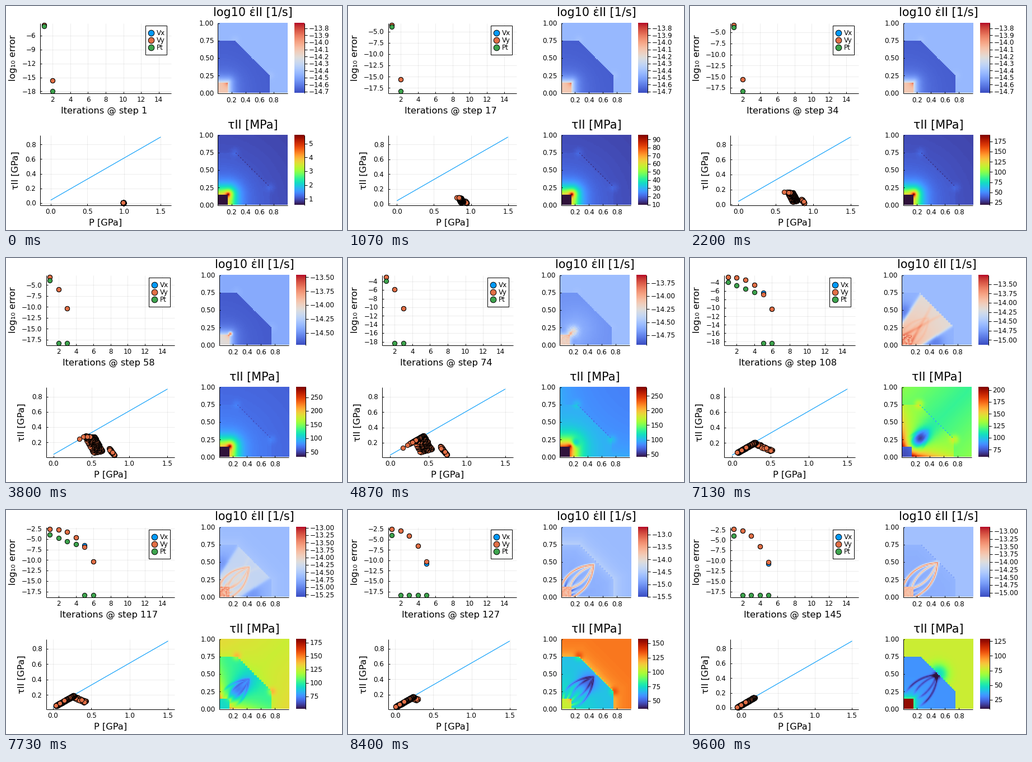
A matplotlib script for the animation above (9.67 s loop, 600 by 400 pixels).

```python
import numpy as np
import matplotlib.pyplot as plt
from matplotlib.animation import FuncAnimation
from matplotlib.collections import LineCollection
from matplotlib.patches import Rectangle

STEPS, LOOP_MS = 145, 9670
FRAMES = STEPS + 1  # the last step is held a little longer
W, H, DPI = 600, 400, 100
PX = 72 / DPI
TICK, GUIDE, TITLE = 11.9, 16.3, 20.8
BLUE, ORANGE, GREEN = "#009AFA", "#E26F46", "#3DA44D"
ROWS = ((30.5, 155.5), (230.5, 355.5))
ONSET = 46  # first step with plastic flow

plt.rcParams["font.family"] = "DejaVu Sans"
fig = plt.figure(figsize=(W / DPI, H / DPI), dpi=DPI, facecolor="white")
ax = fig.add_axes([0, 0, 1, 1])
ax.axis("off")
ax.set_autoscale_on(False)
rng = np.random.default_rng(4)
live = []


def ease(s, a, b):
    k = np.clip((s - a) / (b - a), 0, 1)
    return k * k * (3 - 2 * k)


# ---- scalar histories
def error_range(s):
    return -17.94 - .2 * np.log10(s), -3.7 + .0095 * (s - 1)


def rate_range(s):
    pulse = np.cos(2 * np.pi * (s - 90) / 36)
    lo = -14.72 - ease(s, 58, 90) * (.61 + .19 * pulse)
    hi = -13.725 + .0105 * max(s - ONSET, 0) + .18 * ease(s, ONSET, 58) * pulse
    return lo, hi


def tau_range(s):
    softening = 206 + 81 * np.cos(np.pi * max(s - 62, 0) / 92)
    return min(.55 * s, 65 - 1.52 * (s - 108)), min(5.61 * s, softening)


def residuals(s):
    lo, hi = error_range(s)
    stall = 96 <= s < 118  # pressure converges slowly here
    n = 2 + int(np.ceil(np.clip((s - ONSET) / 28, 0, 3))) + stall
    end = -15.6 if n == 2 else -10.3
    k = np.arange(n)
    vy = hi + (end - hi) * (k / (n - 1)) ** (.45 * n)
    vx = vy.copy()
    if stall:
        vx[-2] += .4
    elif s > 96:
        vx[-1] -= .5
    pt = np.where(k < (4 if stall else 1), -3.92 - .78 * k, lo)
    return vx, vy, pt


# ---- stress cloud: elastic patches that slide onto the yield line
V, U = [a.ravel() for a in np.meshgrid(np.linspace(1, 0, 9), np.linspace(1, 0, 44), indexing="ij")]
U = np.r_[U + rng.uniform(-.02, .02, U.size), -.12, -.5, rng.uniform(.1, .6, 2)]
V = np.r_[V + rng.uniform(-.05, .05, V.size), np.zeros(4)]
SU, SV = rng.random((2, 70))

# corners (P, tau) after 34 elastic steps
MAIN = np.array([(.655, .165), (.735, .155), (.72, .04), (.79, .055)])
SIDE = np.array([(.84, .08), (.885, .02), (.845, .06), (.88, .018)])


def yield_stress(p):
    return 0.041 + 0.5736 * p


def elastic(corners, u, v, s):
    u, v = u[:, None], v[:, None]
    a, b, c, d = corners
    p, t = ((1 - v) * ((1 - u) * a + u * b) + v * ((1 - u) * c + u * d)).T
    p = 1 - (1 - p) * s / 34
    return np.array([p, np.minimum(t * s / 34, yield_stress(p) + .004)])


def cloud(s):
    centre, reach = .18 - .0033 * (s - 108), .115
    p = centre + reach * (2 * np.clip(U, 0, 1) - 1) + .015 * V
    strip = np.array([p, yield_stress(p) - .015 * V])
    tip = centre + reach
    tail = .24 * (1 - ease(s, 104, 140)) * SU
    arc_p = tip + tail - .03 * SV
    bend = np.array([arc_p, yield_stress(tip) - .45 * tail - .02 * SV])

    late = ease(s, 70, 108)
    main = (1 - late) * elastic(MAIN, U, V, s) + late * strip
    side = (1 - late) * elastic(SIDE, SU, SV, s) + late * bend
    return np.hstack([side, main])


# ---- field maps, normalised to their colour range
N = 62
X, Y = np.meshgrid((np.arange(N) + .5) / N, (np.arange(N) + .5) / N)
R = np.hypot(X, Y)
OCT = (X < .75) & (Y < .75) & (X + Y < .999)
SQ = (X < .15) & (Y < .15)
D = np.hypot(np.maximum(X - .15, 0), np.maximum(Y - .15, 0))
DC = np.hypot(X - .15, Y - .15)
RIM = np.maximum(np.maximum(X, Y) - .75, (X + Y - 1) / 2 ** .5)
DASH = (np.abs(X + Y - 1) < .005) & (np.arange(N) % 2 == 0) & (X > .25) & (Y > .25)
NOISE = rng.uniform(-1, 1, (N, N))
FAN = np.cos(18 * np.arctan2(Y, X)) * np.exp(-D / .07) * ~SQ


def blob(x, y, r):
    return np.exp(-((X - x) ** 2 + (Y - y) ** 2) / r ** 2)


def zones(square, inside, outside):
    return np.where(SQ, square, np.where(OCT, inside, outside))


def both(f):
    return f + f.T


NOTCH = both(blob(.25, .75, .06))
LENS = 1 / (1 + np.exp(-np.minimum(.3 + 1.55 * X - Y, .3 + 1.55 * Y - X) / .02))


def rate_fields():
    start = zones(.6 + .35 * np.exp(-DC / .04),
                  .03 + .4 * np.exp(-D / .06) + .1 * np.exp(-R / .35),
                  .28 + .03 * NOTCH)
    early = start * .84 + .5 * blob(.16, .16, .025)
    lobe = (.42 + .15 * NOISE) * blob(.2, .2, .07)
    spread = zones(.64 + .05 * NOISE,
                   .31 + .12 * blob(.25, .25, .25) + lobe - both(.12 * blob(.05, .2, .05)),
                   .36) - .05 * DASH
    cross = both(np.exp(-((Y - .12 - .55 * X) / .025) ** 2)) * np.exp(-R / .4)
    lens = .62 - .14 * R + .14 * np.exp(-R / .2) + .25 * cross
    rest = .26 - both(.13 * blob(.03, .48, .12))
    flow = zones(.75 + .12 * NOISE, rest + (lens - rest) * LENS, .29) + .12 * DASH
    halo = np.exp(-np.abs(RIM) / .1)
    shear = zones(.68 + .06 * NOISE, .25 + .06 * halo + .22 * FAN, .29 + .08 * halo) - .1 * DASH
    late = zones(.65 + .03 * NOISE, .25 + .02 * halo + .12 * FAN, .31) - .1 * DASH
    return [start, start, early, spread, flow, shear, late]


def tau_fields():
    glow = .45 * np.exp(-(D / .12) ** 1.3) + .5 * np.exp(-DC / .03)
    far = .06 + .09 * np.exp(-R / .7)
    start = zones(0, far + .01 + glow, far) + .025 * NOTCH - .04 * DASH
    early = zones(0, start + .04, start + .04)
    spread = zones(0, .31 + .62 * np.exp(-D / .13) - .4 * blob(.22, .2, .06),
                   .2 + .12 * both(np.exp(-X / .3))) + .08 * NOTCH - .08 * DASH
    wall = both(np.exp(-X / .1 - np.maximum(Y - .15, 0) / .35))
    along, across = (X + Y) / 2, X - Y
    valley = (.36 * np.exp(-((along - .26) / .1) ** 2 - (across / .13) ** 2)
              + .1 * np.exp(-(across / .25) ** 2))
    flow = zones(.08 + 1.2 * R ** 2, .47 + .5 * wall - valley,
                 .38 + .09 * np.abs(across)) + .12 * NOTCH - .15 * DASH
    shear = zones(.55 + .4 * np.exp(-DC / .03),
                  .25 + .18 * np.exp(-R / .25) - .14 * blob(.38, .38, .13) + .1 * FAN,
                  .76 - .08 * np.exp(-RIM / .08)) + .12 * NOTCH - .2 * DASH
    late = zones(.97, .19 + .2 * np.exp(-D / .06) - .2 * blob(.48, .48, .05),
                 .56 - .25 * blob(.5, .5, .14)) - .1 * DASH
    return [start, start, early, spread, flow, shear, late]


FIELD_KEYS = [1, ONSET, 58, 90, 108, 127, 145]
RATES, TAUS = rate_fields(), tau_fields()


def blend(fields, s):
    k = np.interp(s, FIELD_KEYS, range(len(FIELD_KEYS)))
    j = min(int(k), len(fields) - 2)
    return fields[j] + (k - j) * (fields[j + 1] - fields[j])


def arc(start, ctrl, tip):
    q = np.linspace(0, 1, 50)[:, None]
    path = (1 - q) ** 2 * start + 2 * q * (1 - q) * ctrl + q ** 2 * tip
    gap = np.min((X[..., None] - path[:, 0]) ** 2 + (Y[..., None] - path[:, 1]) ** 2, axis=2)
    band = np.exp(-gap / .017 ** 2)
    return np.maximum(band, band.T)


def shear_bands(s):
    t = .33 + .16 * np.sin(np.pi / 2 * (s - 98) / (STEPS - 98))
    tip = np.array([t, t])
    outer = arc(np.array([0, .17]), np.array([.3, .95]) * t, tip)
    inner = arc(np.array([.13, .15]), np.array([.4, .75]) * t, tip)
    return np.maximum(outer, .75 * inner) * ease(s, 98, 127)


def maps(s):
    rate, tau = blend(RATES, s), blend(TAUS, s)
    if s > 98:
        band = shear_bands(s) * ~SQ
        rate = rate + band * np.maximum(.76 - rate, 0)
        tau = tau - .15 * band * np.clip((R - .2) / .15, -1, 1)
    return np.clip(rate, 0, 1), np.clip(tau, 0, 1)


# ---- drawing helpers, all in stage pixels
def image(cmap, data):
    return ax.imshow(data, cmap=cmap, vmin=0, vmax=1, origin="lower", aspect="auto",
                     interpolation="nearest", zorder=1)


RAMP = np.linspace(0, 1, 256)[:, None]
CMAPS = ("coolwarm", "turbo")
map_imgs = [image(c, np.zeros((N, N))) for c in CMAPS]
bar_imgs = [image(c, RAMP) for c in CMAPS]
ax.set_xlim(0, W)
ax.set_ylim(H, 0)


def text(x, y, label, size, ha="center", angle=0):
    live.append(ax.text(x, y, label, fontsize=size * PX, ha=ha, va="baseline",
                        rotation=angle, rotation_mode="anchor", zorder=8))


def tick_text(x, y, label, ha="center"):
    text(x, y + .365 * TICK, label, TICK, ha)


def lines(segments, color="black", width=1, alpha=1, z=3):
    live.append(ax.add_collection(LineCollection(
        segments, colors=color, linewidths=width * PX, alpha=alpha, zorder=z), autolim=False))


def dots(x, y, color, size=8.2, z=5):
    live.extend(ax.plot(x, y, "o", ms=size * PX, mfc=color, mec="black", mew=PX, zorder=z))


def number(v, digits):
    return f"{v + 0.0:.{digits}f}".replace("-", "−")


def ticks(lo, hi, step):
    return np.arange(np.ceil(lo / step - 1e-6), np.floor(hi / step + 1e-6) + 1) * step


def padded(lo, hi):
    pad = .03 * (hi - lo)
    return lo - pad, hi + pad


def axes(x0, x1, row, xlim, ylim, xticks, yticks, xdig, ydig, label_y, gap=7.5, grid=True):
    top, bot = ROWS[row]
    fx = lambda v: x0 + (v - xlim[0]) / (xlim[1] - xlim[0]) * (x1 - x0)
    fy = lambda v: bot - (v - ylim[0]) / (ylim[1] - ylim[0]) * (bot - top)
    xs, ys = [fx(v) for v in xticks], [fy(v) for v in yticks]
    if grid:
        lines([[(x, top), (x, bot)] for x in xs] + [[(x0, y), (x1, y)] for y in ys],
              width=.8, alpha=.09, z=2)
    marks = [[(x, bot), (x, bot - 2.5)] for x in xs] + [[(x0, y), (x0 + 2.5, y)] for y in ys]
    lines(marks + [[(x0, top), (x0, bot)], [(x0, bot), (x1, bot)]])
    for x, v in zip(xs, xticks):
        tick_text(x, label_y, number(v, xdig))
    for y, v in zip(ys, yticks):
        tick_text(x0 - gap, y, number(v, ydig), "right")
    return fx, fy


def legend(x):
    live.append(ax.add_patch(Rectangle((x, 35), 38, 52, fc="white", ec="black", lw=PX, zorder=6)))
    for k, (name, color) in enumerate(zip(("Vx", "Vy", "Pt"), (BLUE, ORANGE, GREEN))):
        y = 48 + 13 * k
        dots([x + 10], [y], color, 10.6, z=7)
        tick_text(x + 20, y, name, "left")


def field_panel(row, x0, title, data, lo, hi, step, digits):
    top, bot = ROWS[row]
    x1, bar0, bar1 = x0 + 124.5, x0 + 137, x0 + 154.5
    map_imgs[row].set_data(data)
    map_imgs[row].set_extent((x0, x1, bot, top))
    bar_imgs[row].set_extent((bar0, bar1, bot, top))
    axes(x0, x1, row, (0, 1), (0, 1), np.arange(1, 5) / 5, np.arange(5) / 4, 1, 2,
         bot + 12, gap=6.5, grid=False)
    text((x0 + x1) / 2 + 1, top - 12, title, TITLE)
    segs = [[(bar1, top), (bar1, bot)]]
    for v in ticks(lo, hi, step):
        y = bot - (v - lo) / (hi - lo) * (bot - top)
        segs.append([(bar1, y), (bar1 + 5, y)])
        tick_text(bar1 + 8, y, number(v, digits), "left")
    lines(segs)


def error_step(span):
    if span < 14.4:
        return 3
    return 2 if 15.25 < span < 15.75 else 2.5


def rate_step(span):
    if span < 1.15:
        return .1, 1
    return (.25, 2) if span < 2.6 else (.5, 1)


def tau_step(span):
    return next((k for k in (1, 2, 5, 10, 25) if span / k < 9), 50)


def draw(i):
    s = min(i + 1, STEPS)
    while live:
        live.pop().remove()

    lo, hi = error_range(s)
    step = error_step(hi - lo)
    wide = step == 2.5  # decimal labels need a wider margin
    x0, x1 = (72, 301) if wide else (61, 295)
    map_x = 380.5 if wide else 378

    # convergence history
    ylim = padded(lo, hi)
    fx, fy = axes(x0, x1, 0, padded(1, 15), ylim, range(2, 15, 2), ticks(*ylim, step),
                  0, int(wide), 166.5)
    for values, color in zip(residuals(s), (BLUE, ORANGE, GREEN)):
        dots(fx(np.arange(1, len(values) + 1)), fy(values), color)
    legend(x1 - 46)
    text((x0 + x1) / 2 - 3, 192, f"Iterations @ step {s}", GUIDE)
    text(16.5, 93, "log₁₀ error", GUIDE, angle=90)

    # stress state against the yield line, equal aspect
    p, t = cloud(s)
    tau_lo, tau_hi = tau_range(s)
    high = yield_stress(1.5)
    ylim = padded(min(yield_stress(0), tau_lo / 1000), high)
    half = (x1 - x0) / 125 * (ylim[1] - ylim[0]) / 2
    mid = (min(0, p.min()) + 1.5) / 2
    fx, fy = axes(x0, x1, 1, (mid - half, mid + half), ylim, np.arange(4) / 2,
                  ticks(*ylim, .2), 1, 1, 366.5)
    lines([[(fx(0), fy(yield_stress(0))), (fx(1.5), fy(high))]], BLUE, 1.1)
    dots(fx(p), fy(t), ORANGE)
    text((x0 + x1) / 2, 392, "P [GPa]", GUIDE)
    text(x0 - 39.5, 293.5, "τII [GPa]", GUIDE, angle=90)

    # strain rate and stress maps
    rate, tau = maps(s)
    lo, hi = rate_range(s)
    field_panel(0, map_x, "log10 ε\u0307II [1/s]", rate, lo, hi, *rate_step(hi - lo))
    field_panel(1, map_x, "τII [MPa]", tau, tau_lo, tau_hi, tau_step(tau_hi - tau_lo), 0)
    return live


anim = FuncAnimation(fig, draw, frames=FRAMES, interval=LOOP_MS / FRAMES,
                     repeat=True, repeat_delay=0, blit=False, cache_frame_data=False)
plt.show()
```
